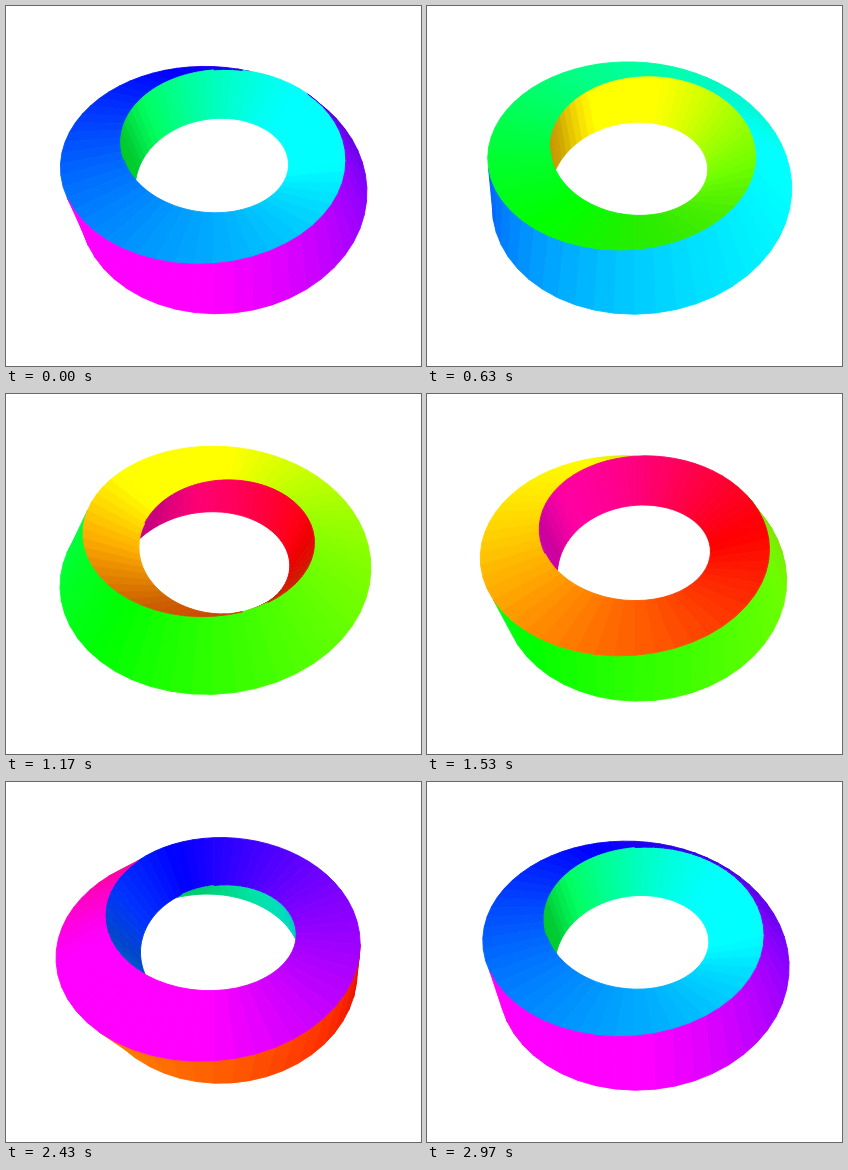
An HTML page with a canvas for the animation above (3 s loop, 415 by 360 pixels).

```html
<!DOCTYPE html>
<html lang="en">
<head>
<meta charset="utf-8">
<title>Rolling twisted ring</title>
<style>
html, body { margin: 0; width: 100%; height: 100%; overflow: hidden; background: #fff; }
canvas { display: block; }
</style>
</head>
<body>
<canvas id="stage" width="415" height="360"></canvas>
<script>
const ctx = document.getElementById('stage').getContext('2d');
const { sin, cos, PI, max, min, floor, abs } = Math;
const rad = PI / 180;

const LOOP = 3000, STEP = 30;
const CX = 207.9, CY = 153.4;      // projection centre
const RING = 111.4, HALF = 38.8;   // ring radius, half diagonal of the square section
const DIST = 374, TILT = 47.1 * rad;
const START = 60.5;                // corner angle at the front when the loop begins
const HUE = 201;                   // hue of the top face at the front
const SEGS = 60;

const sinT = sin(TILT), cosT = cos(TILT);
const light = { az: -15 * rad, h: cosT, v: sinT };

// Perspective view of a corner; a is the angle round the ring from the front
function project(a, psi) {
  const rho = RING + HALF * cos(psi * rad);
  const z = HALF * sin(psi * rad);
  const front = rho * cos(a * rad);
  const scale = DIST / (DIST - front * cosT - z * sinT);
  return [CX + rho * sin(a * rad) * scale,
          CY + (front * sinT - z * cosT) * scale];
}

function shade(hue, a, normal) {
  const n = normal * rad;
  const dot = cos(n) * cos(a * rad - light.az) * light.h + sin(n) * light.v;
  const level = 0.8 + 0.45 * max(0, dot);
  const channel = shift => {
    const k = (((hue + shift) % 360) + 360) % 360 / 60;
    const c = min(1, max(0, abs(k - 3) - 1));
    return Math.round(255 * min(1, c * level));
  };
  return `rgb(${channel(0)},${channel(240)},${channel(120)})`;
}

function drawQuad(p, color) {
  ctx.beginPath();
  p.forEach(([x, y], i) => i ? ctx.lineTo(x, y) : ctx.moveTo(x, y));
  ctx.closePath();
  ctx.fillStyle = ctx.strokeStyle = color;
  ctx.fill();
  ctx.stroke();
}

// Signed area tells which way the face is turned
function area(p) {
  return (p[2][0] - p[0][0]) * (p[3][1] - p[1][1]) -
         (p[3][0] - p[1][0]) * (p[2][1] - p[0][1]);
}

function drawSection(a0, a1, roll) {
  const mid = (a0 + a1) / 2;
  for (let k = 0; k < 4; k++) {
    const corner = START + 90 * k - roll;
    const p = [
      project(a0, corner + a0 / 4),
      project(a1, corner + a1 / 4),
      project(a1, corner + 90 + a1 / 4),
      project(a0, corner + 90 + a0 / 4)
    ];
    if (area(p) >= 0) continue;
    drawQuad(p, shade(HUE - 90 * k - mid / 4, mid, corner + 45 + mid / 4));
  }
}

function draw(t) {
  const roll = 360 * t / LOOP;
  const width = 360 / SEGS;
  ctx.fillStyle = '#fff';
  ctx.fillRect(0, 0, 415, 360);
  ctx.lineWidth = 0.9;
  ctx.lineJoin = 'round';
  // from the back of the ring to the front
  for (let a = 180; a > 0; a -= width) {
    drawSection(-a, width - a, roll);
    drawSection(a - width, a, roll);
  }
}

function tick() {
  const t = performance.now() % LOOP;
  draw(floor(t / STEP) * STEP);
  requestAnimationFrame(tick);
}
tick();
</script>
</body>
</html>
```
